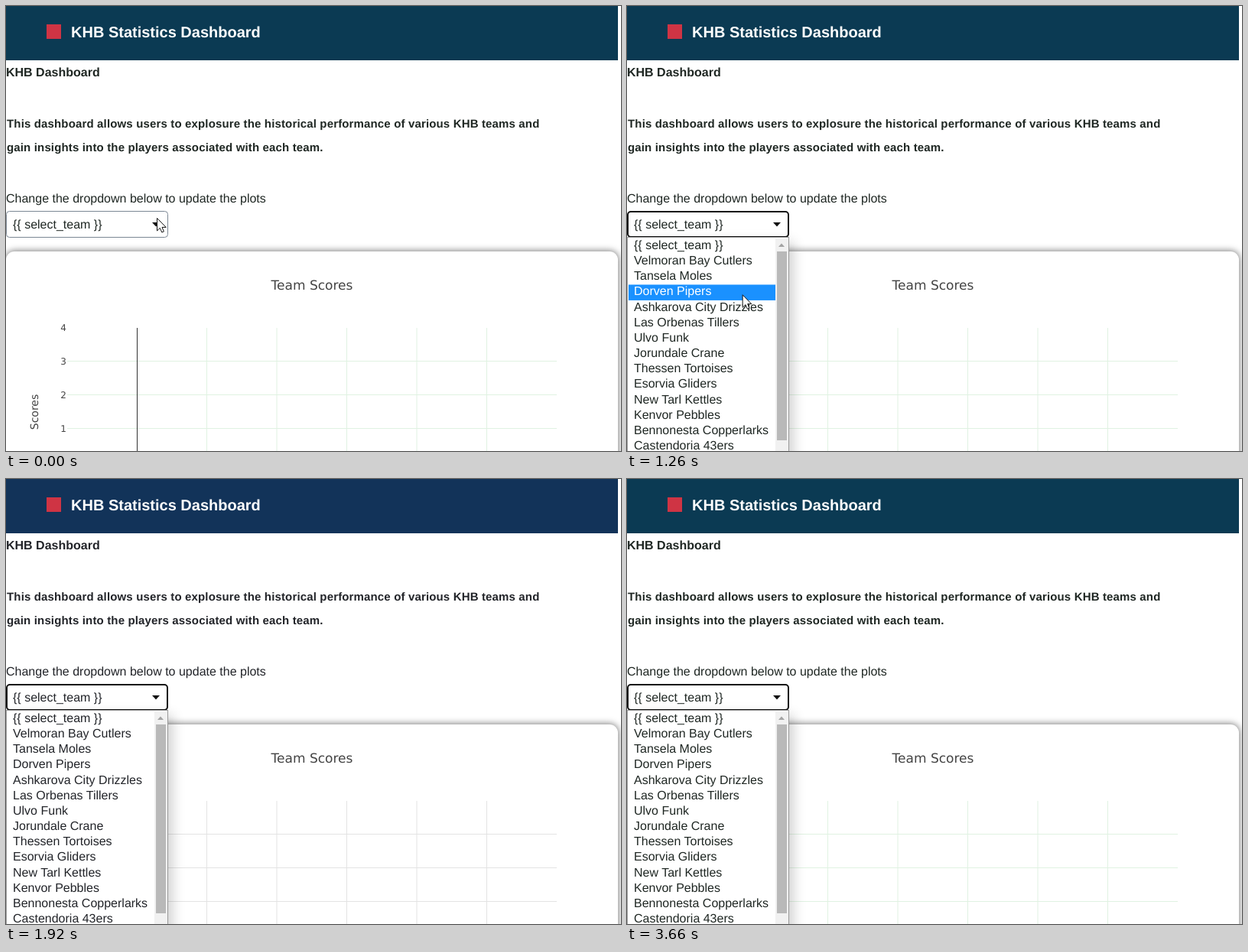
Animation, 804 px wide and 582 px high, one loop 3.96 s. Source, as an HTML page:

```html
<!DOCTYPE html>
<html lang="en">
<head>
<meta charset="utf-8">
<title>Statistics Dashboard</title>
<style>
  html, body { margin: 0; width: 100%; height: 100%; overflow: hidden; background: #fff; }
  #stage {
    --bar: #0b3a53; --grid: #e0f2e2; --ink: #1f2723;
    position: relative; width: 804px; height: 582px; overflow: hidden;
    font: 16px "Liberation Sans", Arial, sans-serif;
  }
  #stage.navy { --bar: #123359; --grid: #e3e3e3; --ink: #222429; }
  #panel, #popup { position: absolute; background: #fff; }
  #panel {
    left: 0; top: 321px; width: 800px; height: 400px; border-radius: 11px;
    box-shadow: 0 0 8px 1px rgba(0, 0, 0, .5);
  }
  #popup {
    left: 1px; top: 303px; width: 210px; height: 400px;
    box-shadow: 0 0 0 1px #999, 6px 6px 16px rgba(0, 0, 0, .2);
  }
  svg { position: absolute; left: 0; top: 0; display: block; }
  text { fill: var(--ink); white-space: pre; text-rendering: geometricPrecision; }
  .bold { font-weight: 700; }
  .lead { font-weight: 700; font-size: 15px; letter-spacing: .15px; }
  .chart text { font-family: "DejaVu Sans", Verdana, sans-serif; fill: #444; }
  .grid { stroke: var(--grid); fill: none; }
  #rows .on { fill: #fff; }
</style>
</head>
<body>
<div id="stage">
  <div id="panel"></div>
  <svg width="804" height="582">
    <rect width="800" height="71" fill="var(--bar)"/>
    <rect x="53" y="24" width="19" height="19" fill="#cf3444"/>
    <text class="bold" x="85" y="41" font-size="20" style="fill:#fff">KHB Statistics Dashboard</text>
    <text class="bold" x="0" y="92">KHB Dashboard</text>
    <text class="lead" x="1" y="159">This dashboard allows users to explosure the historical performance of various KHB teams and</text>
    <text class="lead" x="1" y="190">gain insights into the players associated with each team.</text>
    <text x="0" y="257">Change the dropdown below to update the plots</text>

    <g class="chart">
      <text x="400" y="371" font-size="17" text-anchor="middle">Team Scores</text>
      <path class="grid" d="M262.5 421V582M354 421V582M445.5 421V582M537 421V582M628.5 421V582M80 464.5H720M80 508.5H720M80 552.5H720"/>
      <path d="M171.5 421V582" stroke="#333"/>
      <g id="ticks" font-size="12" text-anchor="end"></g>
      <text transform="translate(42 531) rotate(-90)" font-size="14" text-anchor="middle">Scores</text>
    </g>

    <rect id="box" fill="#fff"/>
    <text x="9" y="291">{{ select_team }}</text>
    <path d="M191 283h10l-5 5.5z" fill="#111"/>
  </svg>

  <div id="list">
    <div id="popup"></div>
    <svg width="804" height="582">
      <rect id="mark" x="2" width="192" height="20.5" fill="#1a91ff"/>
      <rect x="194" y="304" width="17" height="278" fill="#f1f1f1"/>
      <path d="M198 315h8l-4-4.5z" fill="#a3a3a3"/>
      <rect x="196" y="321" width="13" height="247" fill="#b9b9b9"/>
      <g id="rows"></g>
    </svg>
  </div>

  <svg width="804" height="582">
    <path id="cursor" d="M.5 .5V17L4.3 13.4 6.8 19 9.4 17.9 7 12.4H12.2Z" fill="#fff" stroke="#111"/>
  </svg>
</div>

<script>
const LOOP = 3960, PRESS = 690, OPEN = 720, NAVY = [1620, 2010];
const ROW_TOP = 304, ROW = 20.15;
const teams = ["{{ select_team }}", "Velmoran Bay Cutlers", "Tansela Moles", "Dorven Pipers",
  "Ashkarova City Drizzles", "Las Orbenas Tillers", "Ulvo Funk", "Jorundale Crane",
  "Thessen Tortoises", "Esorvia Gliders", "New Tarl Kettles", "Kenvor Pebbles",
  "Bennonesta Copperlarks", "Castendoria 43ers"];
// time, x, y of the pointer tip
const path = [[1080, 197, 277], [1470, 117, 450], [1770, 117, 550], [1890, 117, 604]];

const $ = id => document.getElementById(id);
const set = (el, attrs) => { for (const k in attrs) el.setAttribute(k, attrs[k]); };

function addText(parent, x, y, str) {
  const el = document.createElementNS("http://www.w3.org/2000/svg", "text");
  set(el, { x, y });
  el.textContent = str;
  parent.append(el);
  return el;
}

for (let n = 1; n <= 4; n++) addText($("ticks"), 79, 601 - 44 * n, n);
const rows = teams.map((name, i) => addText($("rows"), 9, 318 + ROW * i, name));

function pointer(t) {
  if (t <= path[0][0]) return path[0].slice(1);
  for (let i = 1; i < path.length; i++) {
    const [t0, x0, y0] = path[i - 1], [t1, x1, y1] = path[i];
    if (t < t1) {
      const p = (t - t0) / (t1 - t0);
      const e = i === 1 ? p * (1 + p * (1 - p)) : p;
      return [x0 + (x1 - x0) * e, y0 + (y1 - y0) * e];
    }
  }
  return path[path.length - 1].slice(1);
}

function draw(t) {
  const pressed = t >= PRESS;
  const [x, y] = pointer(t);
  const active = Math.max(0, Math.floor((y - ROW_TOP) / ROW));

  $("stage").classList.toggle("navy", t >= NAVY[0] && t < NAVY[1]);
  set($("box"), pressed
    ? { x: 1, y: 269, width: 210, height: 33, rx: 4, stroke: "#111", "stroke-width": 2 }
    : { x: .5, y: 268.5, width: 211, height: 34, rx: 4, stroke: "#7b8794", "stroke-width": 1 });
  $("list").style.display = t >= OPEN ? "" : "none";
  set($("mark"), { y: ROW_TOP + ROW * active });
  rows.forEach((row, i) => row.classList.toggle("on", i === active));
  set($("cursor"), { transform: `translate(${x} ${y})` });
}

const start = performance.now();
function tick() {
  draw((performance.now() - start) % LOOP);
  requestAnimationFrame(tick);
}
tick();
</script>
</body>
</html>
```
